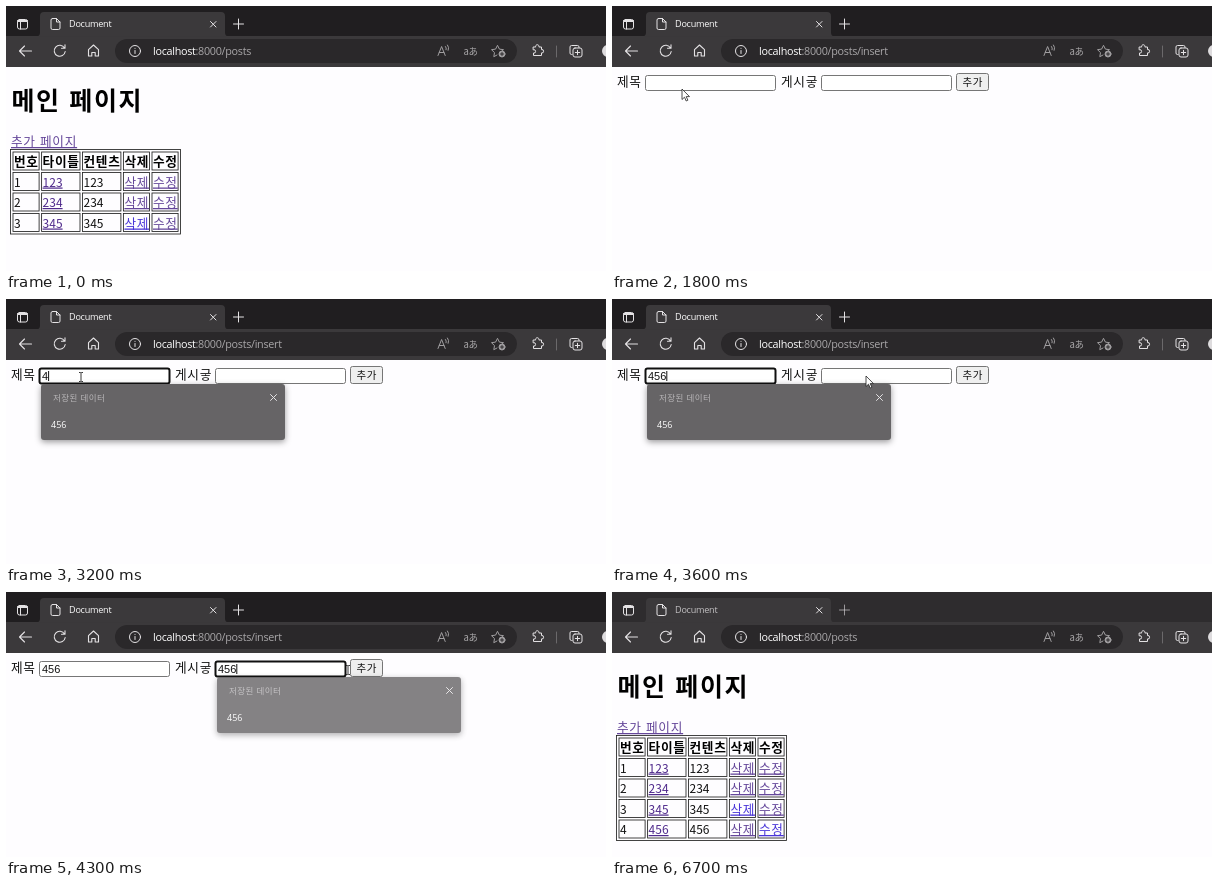
An HTML page for the animation above (6800 ms loop, 600 by 265 pixels).

```html
<!DOCTYPE html>
<html lang="ko">
<head>
<meta charset="utf-8">
<title>Document</title>
<style>
  html, body { margin: 0; width: 600px; height: 265px; overflow: hidden; background: #fefdff; }
  svg { display: block; }
  text { font-family: "Noto Sans CJK KR", "Noto Sans CJK", sans-serif; font-size: 12.7px; letter-spacing: .7px; fill: #111; white-space: pre; }
  .ui { font-family: "Open Sans", "Noto Sans", sans-serif; }
  .bold { font-weight: 700; fill: #000; }
  .title { font-size: 25px; letter-spacing: 1.6px; }
  .num { font-size: 12px; letter-spacing: 0; }
  .link { fill: #65479a; text-decoration: underline; text-underline-offset: 1.5px; }
  .link.num { fill: #4f2a8c; }
  .link.fresh { fill: #4a36d8; }
  .field { font: 11px "Liberation Sans", Arial, sans-serif; letter-spacing: 0; }
  .line { fill: none; stroke: #e4e2e4; stroke-linecap: round; stroke-linejoin: round; }
  .dim { stroke: #a09ea0; }
  .cell { fill: none; stroke: #222; stroke-width: .85; }
  .input { fill: #fff; stroke: #767676; }
  .input.focus { stroke: #101010; stroke-width: 2; }
  .popup { filter: drop-shadow(0 2px 3px rgba(0, 0, 0, .4)); }
</style>
</head>
<body>
<svg id="stage" width="600" height="265" viewBox="0 0 600 265">
  <rect width="600" height="265" fill="#fefdff"/>

  <g id="main">
    <text class="bold title" x="5.500" y="104">메인 페이지</text>
    <text class="link" x="5" y="140">추가 페이지</text>
    <rect id="frame" class="cell" x="4.5" y="143.5" width="170"/>
    <g id="rows"></g>
  </g>

  <g id="insert">
    <text x="5" y="80">제목</text>
    <text x="169" y="80">게시긓</text>
    <g id="fields"></g>
    <rect x="344.5" y="67.5" width="32" height="17" rx="2" fill="#efefef" stroke="#767676"/>
    <text x="350.5" y="80" style="font-size:10.5px">추가</text>
  </g>

  <g id="chrome">
    <rect id="titlebar" width="600" height="31"/>
    <rect y="30" width="600" height="31" fill="#3b393b"/>
    <path d="M30 30.5q4 0 4-4V10q0-4 4-4H215q4 0 4 4v16.5q0 4 4 4z" fill="#3b393b"/>
    <rect x="109" y="33" width="402" height="24" rx="12" fill="#2a282a"/>

    <g class="line">
      <rect x="11.5" y="13.5" width="10" height="9.5" rx="2"/>
      <path d="M12 15h9" stroke-width="2"/>
      <path d="M14.5 15v8"/>
      <path d="M46.5 12.5h4l3.5 3.5v6q0 1.5-1.5 1.5h-6q-1.5 0-1.5-1.5v-8q0-1.5 1.5-1.5zM50.5 12.5v3.5h3.5"/>
      <path d="M204.5 15.5l5.5 5.5m0-5.5l-5.5 5.5"/>
      <path id="plus" d="M227.5 18h10M232.5 13v10"/>
      <path d="M25.5 45h-12m5-5l-5 5 5 5" stroke-width="1.1"/>
      <path d="M58.5 42a5.5 5.5 0 1 0 .7 3.5M59 38.7v3.5h-3.5" stroke-width="1.1"/>
      <path d="M82.5 43.7l5-4.7 5 4.7v6.3h-3.3v-3.5h-3.4v3.5h-3.3z" stroke-width="1.1"/>
      <circle cx="129" cy="45" r="5.5"/>
      <path d="M129 44.5v3M129 42.3v.1"/>
      <path d="M527.5 41h2.2a1.7 1.7 0 1 1 3.2 0h2.6v2.6a1.7 1.7 0 1 1 0 3.3v2.6h-8v-2.5a1.7 1.7 0 1 0 0-3.3z"/>
      <path d="M550.5 40v11" stroke="#6b696b"/>
      <path d="M566 48.5h-.5q-1.5 0-1.5-1.5v-6q0-1.5 1.5-1.5h6q1.5 0 1.5 1.5v.5"/>
      <rect x="567" y="42" width="9" height="9" rx="2"/>
      <path d="M571.5 44.3v4.4M569.3 46.5h4.4"/>
    </g>
    <g class="line dim">
      <path d="M432 49.5l3.6-9 3.6 9M433.3 46.5h4.6M439.5 40.5q1.3 1.5 .6 3.3M441.5 39q2 2.5 .7 5.3"/>
      <path d="M491 49l-3.2 1.7.7-4.1-3-2.9 4.1-.6 1.9-3.8 1.9 3.8 4.1.6-1.5 1.4"/>
      <circle cx="496" cy="48" r="3" fill="#a09ea0"/>
      <path d="M496 46.5v3M494.5 48h3" stroke="#2a282a"/>
    </g>
    <text x="457.5" y="48.5" style="font-size:9.5px;letter-spacing:-.3px;fill:#a8a6a8">aあ</text>
    <circle cx="602" cy="45" r="6" fill="#dedcde"/>
    <text id="tab" class="ui" x="63" y="21" style="font-size:9.1px;letter-spacing:-.25px">Document</text>
    <text class="ui" x="147" y="48.5" style="font-size:10.8px;letter-spacing:-.3px;fill:#fff">localhost<tspan id="path" fill="#a9a7a9"></tspan></text>
  </g>

  <g id="popup" class="popup">
    <rect id="panel" y="85" width="244" rx="3" fill="#666466"/>
    <text id="caption" y="101.5" style="font-size:8.5px;letter-spacing:.4px;fill:#b8b6b8">저장된 데이터</text>
    <path id="close" class="line" d="M0 0l6 6m0-6l-6 6"/>
    <g id="choices"></g>
  </g>

  <g id="cursor">
    <path id="arrow" d="M0 0v10.5l2.5-2.3 1.7 3.8 1.7-.8-1.7-3.6h3.3z" fill="#fff" stroke="#222" stroke-width=".8"/>
    <path id="beam" d="M-2-4.5h1.5L0-4 .5-4.5h1.5M0-4v8M-2 4.5h1.5L0 4l.5.5h1.5" fill="none" stroke="#222" stroke-width=".9"/>
    <path id="hand" d="M-1 1q0-1 1-1t1 1v4l4 .8q1 .3 1 1.4l-.8 4.8h-5.2l-3.5-4.5q0-1.5 2.5 0z" fill="#fff" stroke="#222" stroke-width=".8"/>
  </g>
</svg>
<script>
const LOOP = 6800, STEP = 100;
const $ = id => document.getElementById(id);
const show = (el, on) => el.style.display = on ? '' : 'none';
const label = (x, y, s, cls) => `<text class="${cls}" x="${x}" y="${y}">${s}</text>`;

// table
const GAP = 2.5, ROW = 20.5;
const LEFT = 7, TOP = 146;
const columnStarts = [0, 28.6, 69.5, 110.4, 139];
const heads = ['번호', '타이틀', '컨텐츠', '삭제', '수정'];
const values = ['123', '234', '345', '456'];

function rowMarkup(i) {
  const v = values[i - 1], top = TOP + i * ROW;
  const texts = i ? [i, v, v, '삭제', '수정'] : heads;
  return '<g>' + columnStarts.map((start, c) => {
    const x = LEFT + start, w = (heads[c].length === 3 ? 40.9 : 28.6) - GAP;
    const fresh = (i === 3 && c === 3) || (i === 4 && c === 4);
    let cls = i ? '' : 'bold';
    if (i && c < 3) cls += ' num';
    if (i && c !== 0 && c !== 2) cls += ' link';
    if (fresh) cls += ' fresh';
    return `<rect class="cell" x="${x}" y="${top}" width="${w}" height="${ROW - GAP}"/>` +
      label(x + 1, top + 14, texts[c], cls);
  }).join('') + '</g>';
}
$('rows').innerHTML = [0, 1, 2, 3, 4].map(rowMarkup).join('');
const lastRow = $('rows').lastChild;

// form
const fieldX = [33, 209];
$('fields').innerHTML = fieldX.map(x =>
  `<g><rect class="input" x="${x + .5}" y="69.5" width="130" height="15" rx="2"/>` +
  label(x + 3, 80.5, '', 'field') +
  '<path d="M0 72v10" stroke="#111"/></g>').join('');
const fields = [...$('fields').children].map(g => {
  const [box, text, caret] = g.children;
  return { box, text, caret };
});
const typing = [3200, 4000];
const focusSpan = [[2500, 3700], [3700, 4500]];

// saved entries list
const popupX = [35, 211];
const saved = ['456', '345', '234', '123', '222', '111'];
$('choices').innerHTML = saved.map((s, i) => label(0, 128.5 + i * 26, s, 'ui')).join('');
for (const el of $('choices').children) el.style.cssText = 'font-size:9px;letter-spacing:0;fill:#fff';

// pointer path: time, x, y, shape
const path = [
  [100, 230, 241, 'arrow'], [700, 233, 212, 'arrow'], [1000, 150, 170, 'arrow'],
  [1300, 52, 133, 'hand'], [1500, 50, 132, 'hand'], [1600, 52, 130, 'arrow'],
  [1800, 70, 83, 'arrow'], [2200, 74, 78, 'beam'], [2700, 75, 78, 'beam'],
  [3300, 75, 78, 'beam'], [3400, 120, 80, 'arrow'], [3600, 254, 77, 'arrow'],
  [3700, 256, 78, 'beam'], [4100, 258, 78, 'beam'], [4300, 342, 78, 'beam'],
  [4400, 362, 78, 'arrow'], [4900, 365, 77, 'arrow'], [5200, 368, 77, 'arrow'],
  [5600, 490, 70, 'arrow'], [6300, 545, 2, 'arrow'], [6400, 545, -20, 'arrow']
];

function drawCursor(t) {
  const i = path.findLastIndex(k => k[0] <= t);
  const visible = i >= 0 && i < path.length - 1;
  show($('cursor'), visible);
  if (!visible) return;
  const [t0, x0, y0, shape] = path[i], [t1, x1, y1] = path[i + 1];
  const p = (t - t0) / (t1 - t0);
  $('cursor').setAttribute('transform', `translate(${x0 + (x1 - x0) * p} ${y0 + (y1 - y0) * p})`);
  for (const s of ['arrow', 'beam', 'hand']) show($(s), s === shape);
}

function drawFields(t) {
  fields.forEach(({ box, text, caret }, i) => {
    const count = Math.max(0, Math.min(3, Math.floor((t - typing[i]) / 100) + 1));
    const focused = t >= focusSpan[i][0] && t < focusSpan[i][1];
    text.textContent = '456'.slice(0, count);
    box.classList.toggle('focus', focused);
    show(caret, focused);
    caret.setAttribute('transform', `translate(${fieldX[i] + 3.5 + count * 6.1} 0)`);
  });
}

function drawPopup(t) {
  const open = (t >= 2800 && t < 3700) || (t >= 3800 && t < 4500);
  show($('popup'), open);
  if (!open) return;
  const i = t < 3700 ? 0 : 1, x = popupX[i];
  const all = t < typing[i];
  $('popup').style.opacity = t < 4300 ? 1 : .8 - (t - 4300) / 250;
  $('panel').setAttribute('x', x);
  $('panel').setAttribute('height', all ? 190 : 56);
  $('caption').setAttribute('x', x + 12);
  $('close').setAttribute('transform', `translate(${x + 229.5} 95.5)`);
  [...$('choices').children].forEach((el, n) => {
    el.setAttribute('x', x + 10);
    show(el, all || n === 0);
  });
}

function draw(t) {
  const form = t >= 1600 && t < 4700, added = t >= 4700;
  show($('main'), !form);
  show($('insert'), form);
  show(lastRow, added);
  $('frame').setAttribute('height', (added ? 5 : 4) * ROW + GAP);
  $('path').textContent = form ? ':8000/posts/insert' : ':8000/posts';
  const active = t < 6300;
  $('titlebar').setAttribute('fill', active ? '#201e20' : '#2e2c2e');
  $('tab').style.fill = active ? '#fff' : '#c4c2c4';
  $('plus').style.opacity = active ? 1 : .6;
  drawFields(t);
  drawPopup(t);
  drawCursor(t);
}

const start = performance.now();
function tick() {
  const t = (performance.now() - start) % LOOP;
  draw(Math.floor(t / STEP) * STEP);
  requestAnimationFrame(tick);
}
tick();
</script>
</body>
</html>
```
